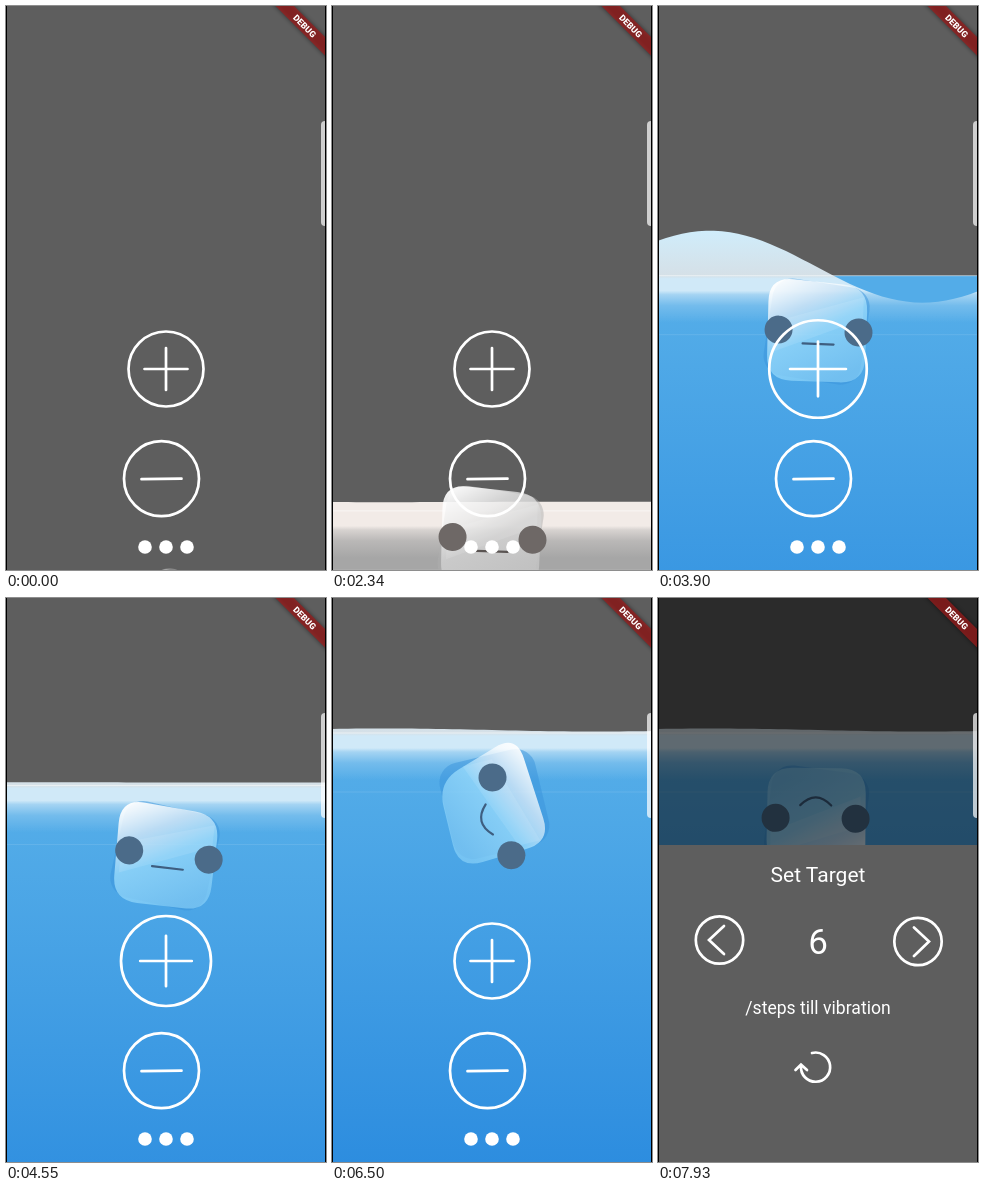
Animation, 320 px wide and 564 px high, one loop 8 s. Source, as an HTML page:

```html
<!DOCTYPE html>
<html lang="en">
<head>
<meta charset="utf-8">
<title>Water tracker</title>
<style>
  html, body { margin: 0; width: 100%; height: 100%; overflow: hidden; background: #5e5e5e; }
  svg { display: block; width: 100vw; height: 100vh; }
  text { font-family: Roboto, sans-serif; fill: #fff; text-anchor: middle; }
  .line { fill: none; stroke: #fff; stroke-width: 2.7; stroke-linecap: round; }
  .line * { vector-effect: non-scaling-stroke; }
</style>
</head>
<body>
<svg viewBox="0 0 320 564">
  <defs>
    <linearGradient id="deep" gradientUnits="userSpaceOnUse" x1="0" y1="40" x2="0" y2="430">
      <stop class="shallow"/><stop class="bottom" offset="1"/>
    </linearGradient>
    <linearGradient id="foam" gradientUnits="userSpaceOnUse" x1="0" y1="-50" x2="0" y2="50">
      <stop class="crest"/><stop class="edge" offset=".5"/>
      <stop class="pale" offset=".53"/><stop class="pale" offset=".65"/>
      <stop class="pale" offset=".69" stop-opacity=".65"/>
      <stop class="pale" offset=".8" stop-opacity=".26"/>
      <stop class="pale" offset=".97" stop-opacity="0"/>
    </linearGradient>
    <linearGradient id="ice" x1=".12" y1="0" x2=".65" y2="1">
      <stop stop-color="#fff" stop-opacity=".96"/>
      <stop offset=".3" stop-color="#fff" stop-opacity=".62"/>
      <stop class="frost" offset=".55" stop-opacity=".72"/>
      <stop class="frost" offset="1" stop-opacity=".5"/>
    </linearGradient>
    <filter id="soft" x="-20%" y="-80%" width="140%" height="260%"><feGaussianBlur stdDeviation="2"/></filter>
  </defs>

  <rect width="320" height="564" fill="#5e5e5e"/>
  <g id="water">
    <rect width="320" height="600" fill="url(#deep)"/>
    <path id="wave" fill="url(#foam)"/>
    <path d="M0 0H320" stroke="#fff" stroke-opacity=".5"/>
    <path d="M0 59H320" stroke="#fff" stroke-opacity=".1"/>
  </g>

  <g id="cube">
    <rect id="back" x="-49" y="-49" width="98" height="98" rx="20" opacity=".5"/>
    <path id="block" fill="url(#ice)"/>
    <path d="M-44 -8L46 -36V-14L-44 22Z" fill="#fff" opacity=".1"/>
    <g id="face">
      <circle cx="-40" r="14"/><circle cx="40" r="14"/>
      <path id="mouth" fill="none" stroke-width="2.2" stroke-linecap="round"/>
    </g>
  </g>

  <g class="line">
    <g id="plus"><circle r="37.5"/><path d="M-21.5 0H21.5M0 -21V21"/></g>
    <g transform="translate(155.5 472.7)"><circle r="37.5"/><path d="M-20 .5L20 0"/></g>
  </g>
  <g fill="#fff">
    <circle cx="139" cy="541" r="6.8"/><circle cx="160" cy="541" r="6.8"/><circle cx="181" cy="541" r="6.8"/>
  </g>

  <rect id="dim" width="320" height="564"/>
  <g id="sheet">
    <rect y="247" width="320" height="317" fill="#5e5e5e"/>
    <text x="160" y="284" font-size="21">Set Target</text>
    <text x="160" y="356" font-size="35">6</text>
    <text x="160" y="416" font-size="17.6">/steps till vibration</text>
    <g class="line">
      <circle cx="61.5" cy="342" r="23.7"/><path d="M66 328L51 342L66 356"/>
      <circle cx="260" cy="343.5" r="23.7"/><path d="M256 329.5L271 343.5L256 358"/>
      <path d="M154 455A14.6 14.6 0 1 1 143 468M137.5 472L143 466.5L149 472"/>
    </g>
  </g>

  <g transform="translate(298.8 20) rotate(45)">
    <rect x="-60" y="-6.5" width="120" height="13" opacity=".5" filter="url(#soft)"/>
    <rect x="-60" y="-6.5" width="120" height="13" fill="#a01c1c" fill-opacity=".72"/>
    <text y="3.2" font-size="8.8" font-weight="900">DEBUG</text>
  </g>
  <rect x="315" y="115" width="10" height="105" rx="4" fill="#fff" fill-opacity=".7"/>
  <path d="M.5 0V564M319.5 0V564" stroke="#000"/>
</svg>

<script>
const LOOP = 8000, STEP = 130, POUR = 1690;
const { sin, cos, exp, abs, min, max, PI } = Math;
const $ = id => document.getElementById(id);
const set = (el, attrs) => { for (const k in attrs) el.setAttribute(k, attrs[k]); };

const ramp = (t, from, to) => min(1, max(0, (t - from) / (to - from)));
const ease = (t, from, to) => { const u = ramp(t, from, to); return u * u * (3 - 2 * u); };
const bump = (t, mid, half) => cos(ramp(abs(t - mid), 0, half) * PI / 2) ** 2;
const mix = (a, b, k) => `rgb(${a.map((v, i) => Math.round(v + (b[i] - v) * k))})`;

// Colours before and after the water turns blue
const GREY = [166, 166, 166], MILK = [242, 235, 231];
const STOPS = {
  shallow: [GREY, [83, 172, 232]],
  bottom: [GREY, [45, 141, 223]],
  crest: [MILK, [207, 238, 253]],
  edge: [MILK, [213, 224, 231]],
  pale: [MILK, [208, 233, 248]],
  frost: [[214, 214, 214], [160, 225, 255]]
};

function level(t) {
  const u = ramp(t, POUR, 5300);
  return 561 - 426 * (u - .07 * sin(2 * PI * u) + .028 * sin(PI * u));
}

// One swinging wave that builds up and dies away
function swell(t) {
  const s = (t - 3900) / 1000;
  return 1.5 + 34.5 * exp(-((s / .963) ** 2)) * cos(2.52 * s);
}

const depth = t => 28 + 43 * ease(t, 2700, 4700) + 14 * ease(t, 6500, 7930);
const turn = t => 2 + 11 * (max(0, t - 3900) / 1000) ** 2;
const press = t => 1 + .1 * bump(t, 1950, 260) + .3 * bump(t, 3900, 390) + .2 * bump(t, 4550, 260);

function wavePath(t) {
  const amp = swell(t), lift = 9 - 6 * ease(t, 3900, 4600);
  let d = "M0 60";
  for (let x = 0; x <= 320; x += 8)
    d += `L${x} ${(-lift - amp * cos((x - 52) * 2 * PI / 425)).toFixed(2)}`;
  return d + "V60Z";
}

function roundedShape(pts, r) {
  const n = pts.length;
  const toward = ([x, y], [p, q]) => {
    const k = r / Math.hypot(p - x, q - y);
    return `${x + (p - x) * k} ${y + (q - y) * k}`;
  };
  return pts.map((p, i) =>
    `${i ? "L" : "M"}${toward(p, pts[(i + n - 1) % n])}Q${p} ${toward(p, pts[(i + 1) % n])}`).join("") + "Z";
}

function paintWater(t, k) {
  set($("water"), { transform: `translate(0 ${level(t)})`, visibility: t < POUR ? "hidden" : "visible" });
  set($("wave"), { d: wavePath(t) });
  for (const name in STOPS)
    for (const stop of document.querySelectorAll("." + name))
      set(stop, { "stop-color": mix(...STOPS[name], k) });
}

function paintCube(t, k) {
  const early = t < POUR;
  const angle = early ? -45 : turn(t);
  const y = early ? 623 - 10 * ease(t, 0, 390) : level(t) + depth(t);
  const tilt = early ? 0 : abs(sin(angle * PI / 180)), look = tilt ** .6;
  const corners = [[-49 - 14 * tilt, -54 + 17 * tilt], [50, -46], [49 + 6 * tilt, 50], [-49 + 15 * tilt, 50]];
  set($("cube"), { transform: `translate(${158.5 + 4 * tilt} ${y}) rotate(${angle})` });
  set($("block"), { d: roundedShape(corners, 25) });
  set($("back"), { transform: `rotate(${7 * (1 - tilt)})`, fill: mix([176, 176, 176], [58, 148, 220], k) });
  set($("face"), { transform: `translate(${14 * look} ${-4.5 * look})`, fill: mix([110, 104, 102], [75, 107, 137], k) });
  set($("mouth"), {
    d: `M-15.5 13Q0 ${13 + 16 * ease(t, 4900, 5700)} 15.5 13`,
    stroke: mix([90, 84, 82], [62, 94, 128], k)
  });
}

function draw(now) {
  const t = Math.floor(now % LOOP / STEP) * STEP;
  const k = ease(t, 3250, 3770), open = ease(t, 6760, 7020);
  paintWater(t, k);
  paintCube(t, k);
  set($("plus"), { transform: `translate(160 363) scale(${press(t)})` });
  set($("dim"), { opacity: .54 * open });
  set($("sheet"), { transform: `translate(0 ${317 * (1 - open)})` });
}

const start = performance.now();
function tick() {
  draw(performance.now() - start);
  requestAnimationFrame(tick);
}
tick();
</script>
</body>
</html>
```
